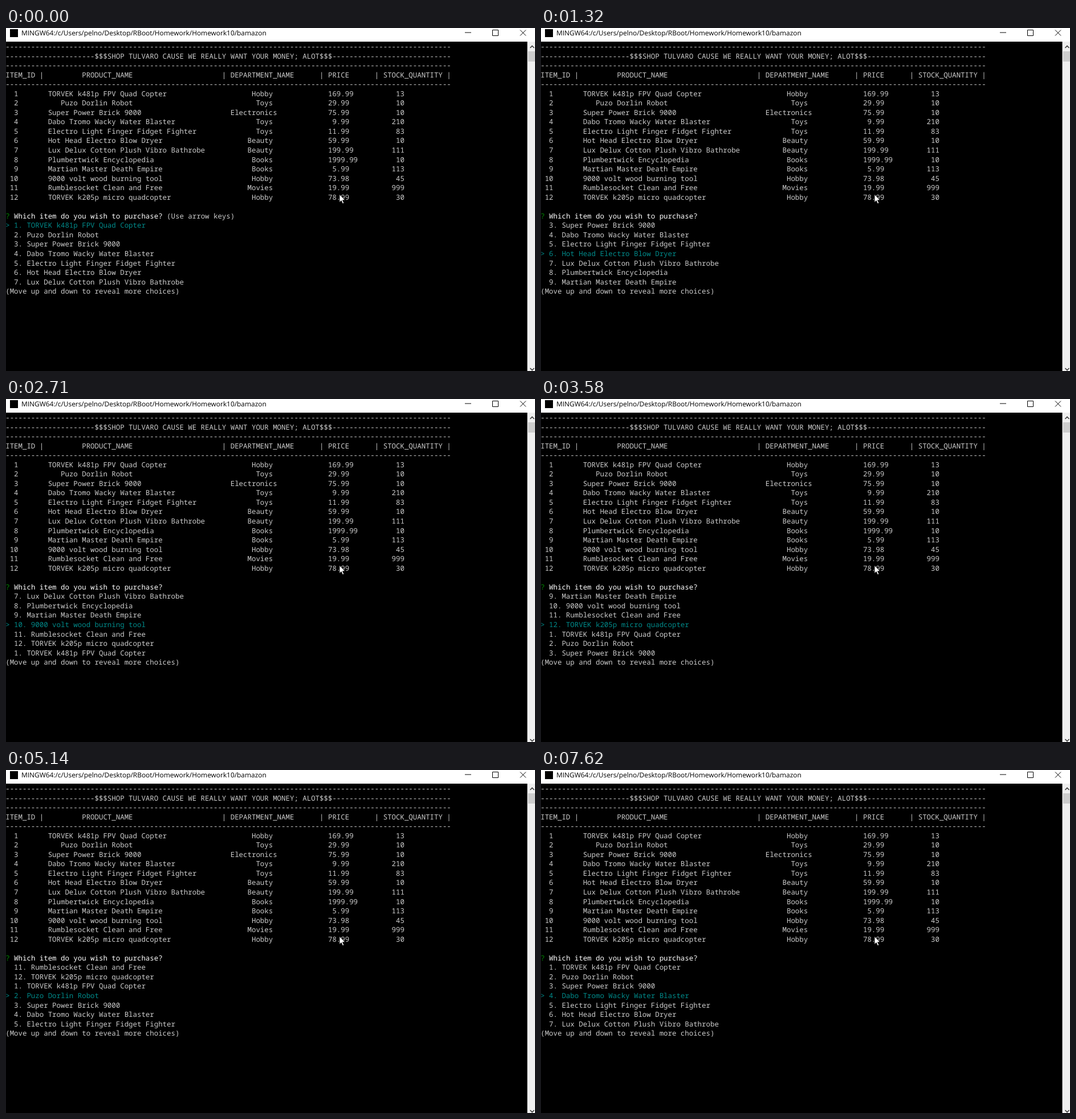
Recreate the animation shown at these times as an HTML page. Size 928 by 603 pixels, loop 8000 ms.

```html
<!DOCTYPE html>
<html lang="en">
<head>
<meta charset="utf-8">
<title>Shop terminal</title>
<style>
  html, body { margin: 0; width: 100%; height: 100%; overflow: hidden; background: #000; }
  #stage { position: relative; width: 928px; height: 603px; overflow: hidden; }
  svg { position: absolute; left: 0; top: 0; }
  #title { position: absolute; left: 27px; top: 0; color: #000; white-space: pre;
    font: 11.9px/18px "Open Sans", sans-serif; text-rendering: geometricPrecision; }
  pre { position: absolute; left: -.8px; top: 25px; margin: 0; color: #ccc;
    font: 12.413px/16.54px "Noto Sans Mono", monospace; text-rendering: geometricPrecision; }
  .mark { color: #008a00; }
  .ask { color: #fff; }
  .picked { color: #008a8a; }
</style>
</head>
<body>
<div id="stage">
  <pre><span id="table"></span><span id="menu"></span></pre>
  <svg width="928" height="603" fill="none">
    <path fill="#fff" d="M0 0H928V24H0z"/>
    <path fill="#000" d="M7 2h14v14H7z"/>
    <path stroke="#000" d="M805 8h11M853.5 3.5h10v10h-10zM902 3.5l10 10m0-10l-10 10"/>
    <path fill="#f0f0f0" d="M914.5 24H928v579h-13.5z"/>
    <path fill="#cdcdcd" d="M916 41h12v18h-12z"/>
    <path stroke="#404040" stroke-width="1.7" d="M919.5 35l3.5-3.5 3.5 3.5M919.5 598l3.5 3.5 3.5-3.5"/>
    <path fill="#fff" stroke="#000" stroke-width=".8"
      d="M585 292.5v14l3.2-3 2.3 5.2 2.3-1-2.3-5h4.4z"/>
  </svg>
  <div id="title">MINGW64:/c/Users/pelno/Desktop/RBoot/Homework/Homework10/bamazon</div>
</div>
<script>
const LOOP = 8000;
const BLANK = [1240, 1320];
const STEPS = [0, 90, 720, 940, 1100, 1320, 1480, 2100, 2410, 2710,
               3120, 3580, 4360, 5140, 5740, 7620];
const VISIBLE = 7;

const products = `TORVEK k481p FPV Quad Copter|Hobby|169.99|13
Puzo Dorlin Robot|Toys|29.99|10
Super Power Brick 9000|Electronics|75.99|10
Dabo Tromo Wacky Water Blaster|Toys|9.99|210
Electro Light Finger Fidget Fighter|Toys|11.99|83
Hot Head Electro Blow Dryer|Beauty|59.99|10
Lux Delux Cotton Plush Vibro Bathrobe|Beauty|199.99|111
Plumbertwick Encyclopedia|Books|1999.99|10
Martian Master Death Empire|Books|5.99|113
9000 volt wood burning tool|Hobby|73.98|45
Rumblesocket Clean and Free|Movies|19.99|999
TORVEK k205p micro quadcopter|Hobby|78.99|30`.split("\n").map(line => line.split("|"));

// Builds a line from [column, text] pairs.
const place = (...cells) => cells.reduce((line, [col, text]) => line.padEnd(col) + text, "");

const rule = "-".repeat(105);
const rows = products.map(([name, dept, price, stock], i) => place(
  [i < 9 ? 2 : 1, i + 1],
  [i === 1 ? 13 : 10, name],
  [Math.max(53, 63 - dept.length), dept],
  [price < 10 ? 77 : 76, price],
  [stock.length > 2 ? 91 : 92, stock]));

document.getElementById("table").textContent = [
  rule,
  "-".repeat(21) + "$$$SHOP TULVARO CAUSE WE REALLY WANT YOUR MONEY; ALOT$$$" + "-".repeat(28),
  rule,
  place([0, "ITEM_ID |"], [18, "PRODUCT_NAME"], [51, "| DEPARTMENT_NAME"],
        [74, "| PRICE"], [87, "| STOCK_QUANTITY |"]),
  rule, ...rows, "", ""
].join("\n");

function menuHtml(step) {
  const pointer = Math.min(step, 3);
  const hint = step ? "" : " (Use arrow keys)";
  let html = `<span class="mark">?</span> <span class="ask">Which item do you wish to purchase?</span>${hint}\n`;
  for (let row = 0; row < VISIBLE; row++) {
    const item = (step - pointer + row) % products.length;
    const label = `${item + 1}. ${products[item][0]}`;
    html += row === pointer ? `<span class="picked">&gt; ${label}</span>\n` : `  ${label}\n`;
  }
  return html + "(Move up and down to reveal more choices)";
}

const menu = document.getElementById("menu");
let shown = null;

function draw() {
  const t = performance.now() % LOOP;
  const blank = t >= BLANK[0] && t < BLANK[1];
  const html = blank ? "" : menuHtml(STEPS.findLastIndex(start => start <= t));
  if (html !== shown) menu.innerHTML = shown = html;
  requestAnimationFrame(draw);
}
draw();
</script>
</body>
</html>
```
